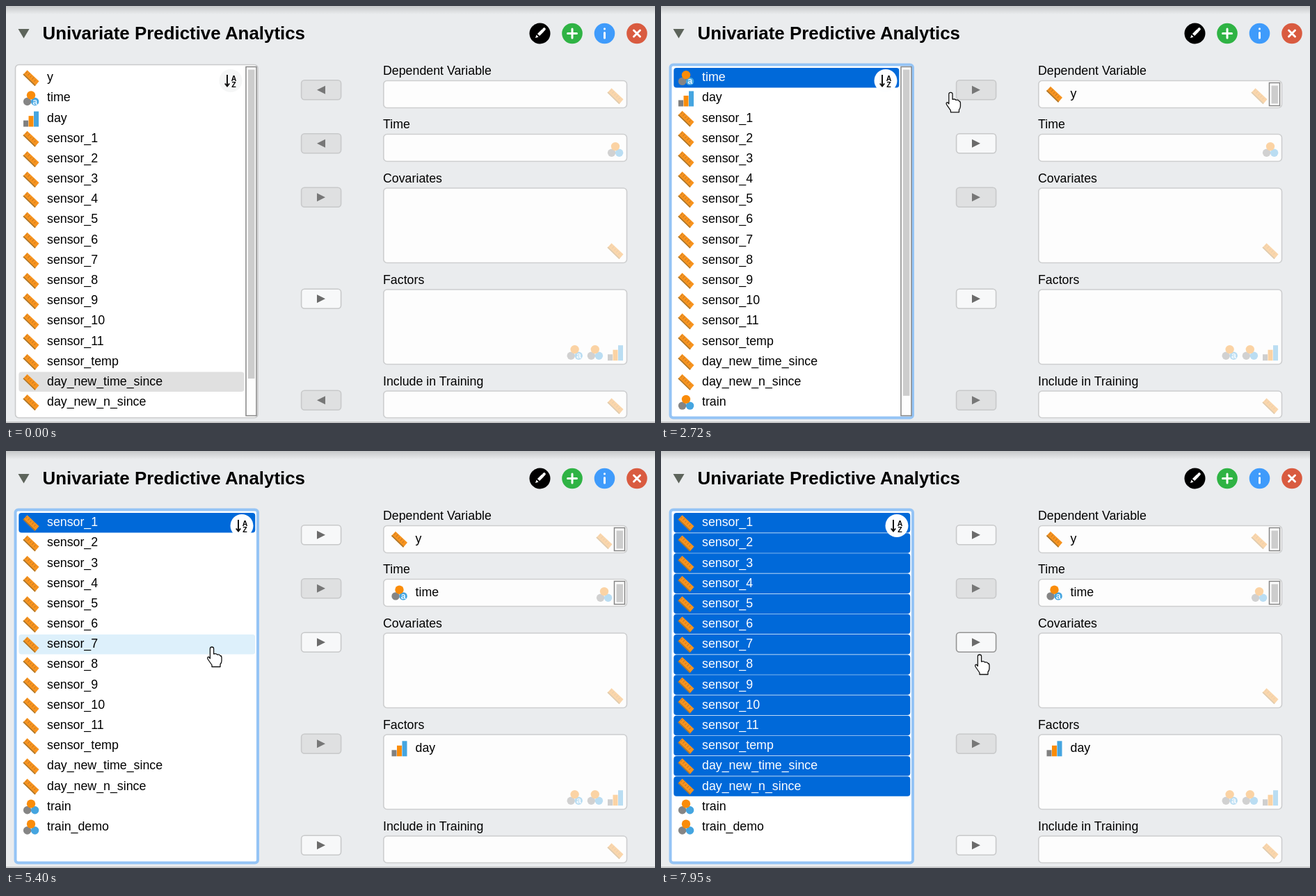
An HTML page for the animation above (8 s loop, 933 by 600 pixels).

```html
<!DOCTYPE html>
<html lang="en">
<head>
<meta charset="utf-8">
<title>Variable assignment</title>
<style>
html, body { margin: 0; width: 100%; height: 100%; overflow: hidden; background: #eaecee; }
svg { display: block; width: 933px; height: 600px; font: 17.8px "Liberation Sans", Arial, sans-serif; }
.title { font-size: 25.9px; font-weight: bold; }
</style>
</head>
<body>
<svg id="stage" viewBox="0 0 933 600">
  <defs>
    <linearGradient id="shade" x2="0" y2="1">
      <stop stop-color="#c6c8c9"/><stop offset="1" stop-color="#eaecee"/>
    </linearGradient>
    <g id="scale">
      <path d="M-5.5-11.5 11.5 4.5 5.5 11.5-11.5-5Z" fill="#f7931e"/>
      <path d="M-11.5-5 5.5 11.5 6.5 10.3-10.5-6.2Z" fill="#a8772f"/>
      <path d="M-7.6-6.8l2-2.3M-4.6-3.9l2.8-3.2M-1.6-1l2-2.3M1.4 1.9l2.8-3.2M4.4 4.8l2-2.3" stroke="#b8742a"/>
    </g>
    <g id="nominal">
      <circle cx="-5.4" cy="4.6" r="5.7" fill="#858585"/>
      <circle cx="5.6" cy="4.6" r="5.7" fill="#45a5e0"/>
      <circle cy="-4.6" r="6.2" fill="#fa8c0a"/>
    </g>
    <g id="text">
      <use href="#nominal"/>
      <text x="5.8" y="8.6" font-size="12.5" font-weight="bold" text-anchor="middle" fill="#e8f6ff">a</text>
    </g>
    <g id="ordinal">
      <path d="M-11 2.500h7v9h-7z" fill="#808080"/>
      <path d="M-3.500-4h7v15.500h-7z" fill="#fa8c0a"/>
      <path d="M4-10.500h7v22h-7z" fill="#45a5e0"/>
    </g>
    <path id="hand" d="M-2.600 2.200Q-2.400 0 0 0T2.600 2.200V10Q6.500 9 7.500 11Q11 10.300 12 12.500Q14 12.800 14 15.500V20Q14 22.500 12 25V28.500H0V26L-5.500 18Q-7.500 14.500-4.600 14.200L-2.600 16.500Z"
      fill="#fff" stroke="#111" stroke-width="1.3" stroke-linejoin="round"/>
  </defs>
  <rect width="933" height="600" fill="#eaecee"/>
  <rect width="933" height="12" fill="url(#shade)"/>
  <path d="M0 598.800H933" stroke="#c0c1c2" stroke-width="1.800"/>
  <path d="M17.500 33H33.500L25.500 46.500Z" fill="#5d645b"/>
  <text class="title" x="52.500" y="48">Univariate Predictive Analytics</text>
  <g stroke="#fff" stroke-width="3" stroke-linecap="round">
    <g stroke="none">
      <circle cx="767.500" cy="39.500" r="15" fill="#000"/>
      <circle cx="814" cy="39.500" r="14.800" fill="#2fb344"/>
      <circle cx="860.500" cy="39.500" r="14.800" fill="#3f9bfb"/>
      <circle cx="907" cy="39.500" r="14.800" fill="#d95b40"/>
    </g>
    <path d="M765.500 41.500 772 35" stroke-width="4.500" stroke-linecap="butt"/>
    <path d="M761 46l1.500-4.500 3 3z" fill="#fff" stroke="none"/>
    <path d="M773 34l.8-.8" stroke-width="4"/>
    <path d="M807.500 39.500h13M814 33v13"/>
    <path d="M860.500 38.500v7.500M860.500 32.800v.1"/>
    <path d="M902.500 35l9 9M911.500 35l-9 9"/>
  </g>
  <g id="view"></g>
</svg>
<script>
const LOOP = 8000, STEP = 70, ROW = 29.17, LIST_TOP = 89, VISIBLE = 17;
const view = document.getElementById('view');

const sensors = Array.from({ length: 11 }, (_, i) => `sensor_${i + 1}`);
const variables = ['y', 'time', 'day', ...sensors, 'sensor_temp',
  'day_new_time_since', 'day_new_n_since', 'train', 'train_demo'];
const kinds = { time: 'text', day: 'ordinal', train: 'nominal', train_demo: 'nominal' };
const kindOf = name => kinds[name] || 'scale';

const fields = [
  { label: 'Dependent Variable', y: 107.5, h: 39, accepts: ['scale'], value: 'y', filled: 1900 },
  { label: 'Time', y: 184.5, h: 39, accepts: ['nominal'], value: 'time', filled: 3480 },
  { label: 'Covariates', y: 262, h: 107.5, accepts: ['scale'] },
  { label: 'Factors', y: 408, h: 107.5, accepts: ['ordinal', 'nominal', 'text'], value: 'day', filled: 4720 },
  { label: 'Include in Training', y: 554, h: 38.5, accepts: ['scale'] }
];
// Which arrow buttons are enabled for each kind of selection
const enabledFor = { scale: '10101', text: '01010', ordinal: '10011', idle: '00010' };

// start, end, number of drawn positions, from, bend, to, easing
const linear = u => u, smooth = u => u * u * (3 - 2 * u), out = u => 1 - (1 - u) ** 3;
const moves = [
  [260, 1010, 11, [638, 546], [350, 320], [100, 112], out],
  [1080, 1830, 11, [100, 112], [280, 125], [448, 118], smooth],
  [1900, 2450, 8, [448, 118], [430, 122], [411, 117], smooth],
  [2650, 3280, 10, [411, 117], [436, 150], [452, 184], linear],
  [3890, 4590, 11, [452, 184], [528, 310], [452, 420], smooth],
  [5050, 5330, 5, [452, 420], [400, 290], [296, 282], smooth],
  [5330, 5760, 7, [296, 282], [240, 325], [190, 392], linear],
  [6160, 6510, 6, [190, 392], [165, 440], [162, 480], smooth],
  [7110, 7880, 12, [162, 480], [360, 147], [458, 278], smooth],
  [7950, 7951, 2, [458, 293], [458, 293], [458, 293], linear]
];
const clicks = [1080, 1900, 3480, 4720, 6710];

function pointer(t) {
  const move = moves.filter(m => m[0] <= t).pop();
  if (!move) return null;
  const [start, end, count, a, b, c, ease] = move;
  const part = Math.min(1, (t - start) / (end - start));
  const u = ease(Math.floor(part * (count - 1) + 1e-6) / (count - 1)), v = 1 - u;
  return a.map((p, i) => v * v * p + 2 * u * v * b[i] + u * u * c[i]);
}

const rect = (x, y, w, h, fill, rest = '') =>
  `<rect x="${x}" y="${y}" width="${w}" height="${h}" fill="${fill}" ${rest}/>`;
const icon = (kind, x, y, alpha = 1) => `<use href="#${kind}" x="${x}" y="${y}" opacity="${alpha}"/>`;
const label = (text, x, y, fill = '#000') => `<text x="${x}" y="${y}" fill="${fill}">${text}</text>`;
const scrollbar = (x, y, h, thumb) =>
  rect(x, y, 15, h, '#fdfdfd', 'stroke="#858585" stroke-width="1.5"') +
  rect(x + 3, y + 4, 9.5, thumb, '#cdcdcd');

function drawList(t, hover) {
  const focus = t >= 1080;
  const names = variables.filter(n => !fields.some(f => f.value === n && t >= f.filled));
  const scrolls = names.length > VISIBLE;
  const width = scrolls ? 324 : 340;
  const last = t >= 6710 ? names.indexOf('day_new_n_since') : 0;
  let s = rect(13.5, 84.5, 348.5, 508, '#fff',
    focus ? 'rx="4" stroke="#95c4f5" stroke-width="4"' : 'rx="5" stroke="#c9cacb" stroke-width="1.6"');
  names.slice(0, VISIBLE).forEach((name, i) => {
    const top = LIST_TOP + i * ROW;
    const selected = focus && i <= last;
    const hovered = hover && hover[0] > 18 && hover[0] < 18 + width && hover[1] >= top && hover[1] < top + ROW;
    const fill = selected ? '#0069d9' : !focus && name === 'day_new_time_since' ? '#e0e0e0' : hovered ? '#ddf0fb' : '';
    if (fill) s += rect(18.3, top, width, 28.5, fill, 'rx="4"');
    s += icon(kindOf(name), 36, top + 14.8) + label(name, 59, top + 19.3, selected ? '#fff' : '#000');
  });
  if (scrolls) s += scrollbar(345, 87.5, 502, 498 * VISIBLE / names.length - 1);
  const x = scrolls ? 323 : 339;
  return s + `<g transform="translate(${x} 107.5)">
    <circle r="16.5" fill="${focus ? '#fdfeff' : '#f5f6f6'}"/>
    <path d="M-5-8.500V7M-8.200 4-5 8-1.800 4" fill="none" stroke="#111" stroke-width="2"/>
    <g font-size="10.500" font-weight="bold" text-anchor="middle"><text x="4.500">A</text><text x="4.500" y="9.500">Z</text></g></g>`;
}

function drawButton(field, i, t, hover) {
  const idle = t < 1080;
  const chosen = t < 1900 ? 'scale' : t < 3480 ? 'text' : t < 4720 ? 'ordinal' : 'scale';
  const enabled = enabledFor[idle ? 'idle' : chosen][i] === '1';
  const y = field.y - 0.8, mid = y + 14;
  const hovered = hover && hover[0] > 424 && hover[0] < 482 && hover[1] > y && hover[1] < y + 28;
  const left = idle && [0, 1, 4].includes(i);
  return rect(424.6, y, 57, 28, enabled ? '#f7f8f9' : '#dfe0e1',
    `rx="4.5" stroke="${hovered ? '#949494' : '#c8c9ca'}" stroke-width="1.6"`) +
    `<path d="M${left ? 459 : 447} ${mid - 6}v12l${left ? -12 : 12}-6z" fill="${enabled ? '#6b6b6b' : '#777'}"/>`;
}

function drawField(field, t) {
  const { y, h, accepts, value } = field;
  const filled = t >= field.filled;
  const shrunk = filled && h < 50;
  let s = label(field.label, 542, y - 8.3) +
    rect(542.8, y, 349.7, h, '#fdfdfd', 'rx="5" stroke="#cdcecf" stroke-width="1.6"');
  accepts.forEach((kind, i) => {
    const order = accepts.length > 1 ? ['ordinal', 'nominal', 'text'].indexOf(kind) : i;
    s += icon(kind, (shrunk ? 860 : 876) - order * 29.2, y + h - 16.8, 0.36);
  });
  if (filled) s += icon(kindOf(value), 565.5, y + 19.8) + label(value, 588.5, y + 24.6);
  if (shrunk) s += scrollbar(874.5, y + 3, 33, 26);
  return s;
}

let shown = '';
function render(t) {
  const tip = pointer(t), hover = pointer(t - STEP);
  let s = drawList(t, hover);
  fields.forEach((f, i) => s += drawField(f, t) + drawButton(f, i, t, hover));
  if (tip) {
    const [x, y] = tip;
    if (clicks.some(c => t >= c && t < c + STEP))
      s += `<circle cx="${x - 2}" cy="${y + 1}" r="19" fill="#d8dc34" opacity=".62"/>`;
    s += `<use href="#hand" x="${x}" y="${y}"/>`;
  }
  if (s !== shown) view.innerHTML = shown = s;
}

const begin = performance.now();
function tick() {
  render((performance.now() - begin) % LOOP);
  requestAnimationFrame(tick);
}
tick();
</script>
</body>
</html>
```
